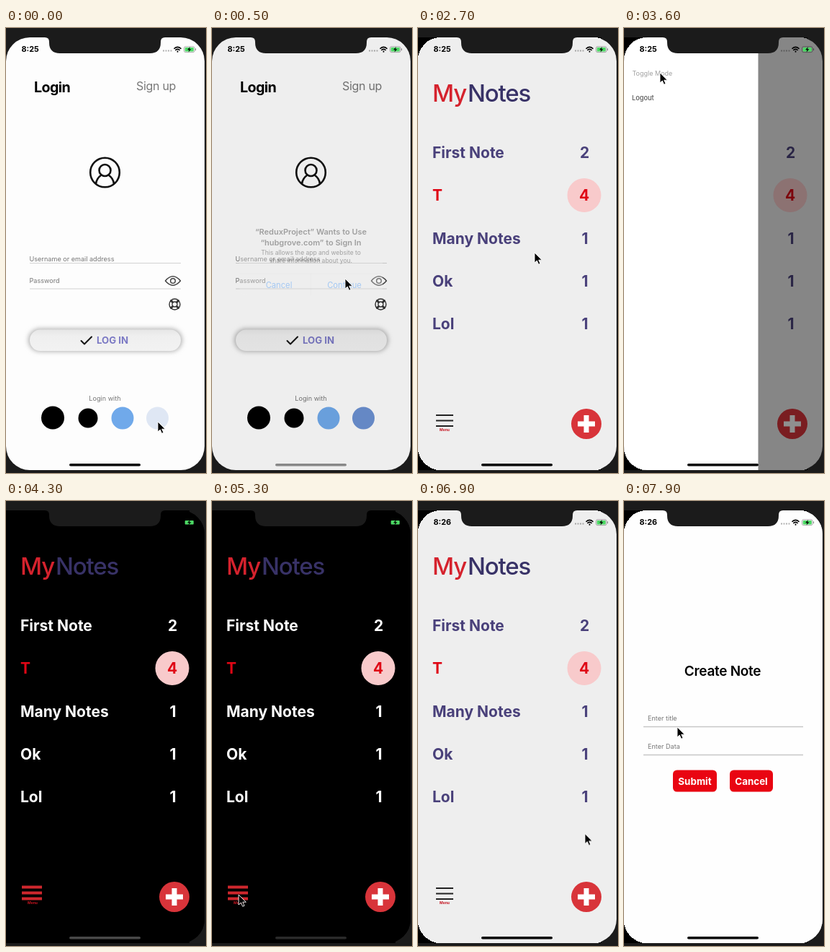
Animation of 278 by 616 pixels, one loop 8 s. Source, as an HTML page:

```html
<!DOCTYPE html>
<html lang="en">
<head>
<meta charset="utf-8">
<title>Notes app walkthrough</title>
<style>
html, body { margin: 0; width: 100%; height: 100%; overflow: hidden; background: #1b1b1b; }
svg { display: block; width: 278px; height: 616px; font-family: Inter, "Open Sans", sans-serif; }
text { dominant-baseline: central; }
.mid { text-anchor: middle; }
.web { font-family: "Liberation Sans", Arial, sans-serif; }
.link { fill: #2a6fe0; }
.ios { fill: #0a7aff; }
.line { fill: none; stroke-linecap: round; stroke-linejoin: round; }
.hint { font-size: 9.1px; fill: #777; }

/* shared 8 s clock */
.move { animation: 8s linear infinite; }
.cut { animation: 8s step-end infinite; }

#cursor { animation-name: cursor; }
#login { animation-name: card; }
#shade { animation-name: shade; }
#alert { animation-name: alert; }
#social { animation-name: social; }
#sheet { animation-name: sheet; animation-timing-function: ease-out; }
#page { animation-name: page; }
#actions { animation-name: actions; }
#progress { animation-name: progress; }
#notes { animation-name: notes; }
#drawer { animation-name: drawer; animation-timing-function: ease-out; }
#dim { animation-name: dim; }
#toggle { animation-name: toggle; }
#create { animation-name: create; animation-timing-function: ease-out; }
#home { animation-name: home; }
.bg { animation-name: bg; }
.rows { animation-name: rows; }
.light { animation-name: light; }
.dark { animation-name: dark; }
.early { animation-name: early; }
.late { animation-name: late; }

@keyframes cursor {
  0%, 1.8% { transform: translate(211px, 545px); }
  4.75%, 9% { transform: translate(185px, 347px); }
  18.75%, 31.25% { transform: translate(154px, 312px); }
  33.5%, 34% { transform: translate(162px, 311px); }
  37.5%, 40% { transform: translate(37px, 545px); }
  44%, 47.5% { transform: translate(50px, 62px); }
  49.5%, 51.25% { transform: translate(230px, 300px); }
  53.5%, 58% { transform: translate(150px, 625px); }
  64%, 68% { transform: translate(37px, 545px); }
  72%, 78% { transform: translate(50px, 62px); }
  81%, 83% { transform: translate(230px, 300px); }
  88%, 92% { transform: translate(233px, 546px); }
  98%, 100% { transform: translate(74px, 313px); }
}
@keyframes card {
  0%, 8.75% { transform: none; }
  12.5%, 23.75% { transform: translate(12.4px, 30.2px) scale(.91); }
  27.5%, 100% { transform: none; }
}
@keyframes shade {
  0%, 1.9% { opacity: 0; }
  3.75%, 5.4% { opacity: .2; }
  6.25% { opacity: .06; }
  7.5%, 8.75% { opacity: 0; }
  12.5%, 23.75% { opacity: .27; }
  27.5%, 100% { opacity: 0; }
}
@keyframes alert {
  0%, 1.9% { opacity: 0; }
  3.75%, 5.4% { opacity: 1; }
  6.25% { opacity: .33; }
  7.5%, 100% { opacity: 0; }
}
@keyframes social { 0%, .6% { opacity: .2; } 2.5%, 100% { opacity: 1; } }
@keyframes sheet {
  0%, 8.75% { transform: translateY(570px); }
  12.5%, 23.75% { transform: none; }
  27.5%, 100% { transform: translateY(570px); }
}
@keyframes page { 0% { opacity: 0; } 13.75%, 100% { opacity: 1; } }
@keyframes actions { 0% { opacity: 1; } 19.75%, 100% { opacity: .5; } }
@keyframes progress {
  0%, 10% { transform: scaleX(0); }
  13.7% { transform: scaleX(1); }
  13.8%, 19.75% { transform: scaleX(0); }
  20.5%, 21.5% { transform: scaleX(.116); }
  24%, 100% { transform: scaleX(.7); }
}
@keyframes notes { 0% { opacity: 0; } 28.75%, 100% { opacity: 1; } }
@keyframes drawer {
  0%, 39% { transform: translateX(-187px); }
  41.5%, 49.5% { transform: none; }
  52%, 67.5% { transform: translateX(-187px); }
  70%, 81% { transform: none; }
  83.5%, 100% { transform: translateX(-187px); }
}
@keyframes dim {
  0%, 39% { opacity: 0; }
  41.5%, 49.5% { opacity: .44; }
  52%, 67.5% { opacity: 0; }
  70%, 81% { opacity: .44; }
  83.5%, 100% { opacity: 0; }
}
@keyframes toggle {
  0% { opacity: 1; }
  44.5% { opacity: .55; }
  46.5% { opacity: 1; }
  75% { opacity: .55; }
  78%, 100% { opacity: 1; }
}
@keyframes create {
  0%, 90% { transform: translateX(278px); }
  93.5%, 100% { transform: none; }
}
@keyframes home {
  0%, 2.5% { fill: #000; }
  4.5%, 7.5% { fill: #888; }
  10%, 47% { fill: #000; }
  51%, 65% { fill: #484848; }
  68%, 100% { fill: #000; }
}
@keyframes bg { 0% { fill: #eee; } 46.25% { fill: #000; } 77.5%, 100% { fill: #eee; } }
@keyframes rows { 0% { fill: #49407a; } 46.25% { fill: #fff; } 77.5%, 100% { fill: #49407a; } }
@keyframes light { 0% { opacity: 1; } 46.25% { opacity: 0; } 77.5%, 100% { opacity: 1; } }
@keyframes dark { 0% { opacity: 0; } 46.25% { opacity: 1; } 77.5%, 100% { opacity: 0; } }
@keyframes early { 0% { opacity: 1; } 62.5%, 100% { opacity: 0; } }
@keyframes late { 0% { opacity: 0; } 62.5%, 100% { opacity: 1; } }
</style>
</head>
<body>
<svg viewBox="0 0 278 616">
  <defs>
    <clipPath id="screen"><rect y="13" width="276" height="599" rx="33"/></clipPath>
    <filter id="soft" x="-10%" y="-50%" width="120%" height="200%"><feGaussianBlur stdDeviation="3"/></filter>
    <linearGradient id="pill" x2="0" y2="1">
      <stop stop-color="#e6e6e6"/><stop offset=".3" stop-color="#efefef"/><stop offset="1" stop-color="#f2f2f2"/>
    </linearGradient>
  </defs>

  <g clip-path="url(#screen)">
    <rect width="278" height="616"/>

    <g id="login" class="move">
      <rect y="13" width="276" height="599" rx="9" fill="#fdfdfd"/>
      <text x="39" y="81.500" font-size="19.700" font-weight="700" letter-spacing="-.6">Login</text>
      <text x="181" y="80" font-size="16" letter-spacing="-.3" fill="#777">Sign up</text>
      <g class="line" stroke="#111" stroke-width="2.600">
        <circle cx="137.500" cy="200" r="20.300"/>
        <circle cx="137.500" cy="197" r="8"/>
        <path d="M125 215.500q1-7.500 7.500-12M150 215.500q-1-7.500-7.500-12"/>
      </g>
      <text class="hint" x="32.500" y="319.500">Username or email address</text>
      <text class="hint" x="32.500" y="349.700">Password</text>
      <path d="M33 325.500H243M33 361H243" stroke="#d2d2d2"/>
      <g class="line" stroke="#444" stroke-width="1.500">
        <path d="M221.500 350q10.500-12.500 21 0q-10.500 12.500-21 0z"/>
        <circle cx="232" cy="350" r="3.300"/>
      </g>
      <g class="line" transform="translate(234.500 382.500)" stroke="#333" stroke-width="1.400">
        <circle r="7.500"/><circle r="3.500"/>
        <path d="M-5-5l2 2M5-5l-2 2M-5 5l2-2M5 5l-2-2" stroke-width="3"/>
      </g>
      <rect x="31" y="416" width="214" height="32" rx="16" fill="#b2b2b2" filter="url(#soft)"/>
      <rect x="33" y="417.500" width="210" height="29.500" rx="14.700" fill="url(#pill)"/>
      <path class="line" d="M104.500 433l4.500 4.500 10-10" stroke="#111" stroke-width="2"/>
      <text x="126" y="432.300" font-size="13.200" font-weight="700" fill="#7b79c4">LOG IN</text>
      <text class="hint mid" x="137.500" y="512.700">Login with</text>
      <circle cx="65" cy="539.500" r="16"/>
      <circle cx="114" cy="540" r="13.500"/>
      <circle cx="162" cy="540" r="15.500" fill="#70a9ea"/>
      <circle id="social" class="move" cx="210.500" cy="540" r="15.500" fill="#6c91d2"/>
      <rect id="shade" class="move" y="13" width="276" height="599" rx="9"/>
    </g>

    <g id="alert" class="move">
      <rect x="38" y="268" width="199" height="102" rx="10" fill="#efefef"/>
      <path d="M38 340H237M137.500 340V370" stroke="#ddd" stroke-width=".7"/>
      <g class="mid" font-size="11" font-weight="600">
        <text x="137.500" y="282">“ReduxProject” Wants to Use</text>
        <text x="137.500" y="297">“hubgrove.com” to Sign In</text>
      </g>
      <g class="mid" font-size="8.500">
        <text x="137.500" y="311">This allows the app and website to</text>
        <text x="137.500" y="321.500">share information about you.</text>
      </g>
      <g class="mid ios" font-size="11.200">
        <text x="93" y="355.500">Cancel</text>
        <text x="184" y="355.500">Continue</text>
      </g>
    </g>

    <g id="sheet" class="move">
      <rect y="48.500" width="276" height="600" rx="8" fill="#f5f5f7"/>
      <text class="ios" x="8.500" y="68" font-size="11.800">Cancel</text>
      <text class="mid" x="137.500" y="68" font-size="11" font-weight="600">hubgrove.com</text>
      <text class="ios" x="226" y="68.500" font-size="8.500">A<tspan font-size="11">A</tspan></text>
      <path class="line" d="M254 64.500l8 8m0-8l-8 8" stroke="#0a7aff" stroke-width="1.300"/>
      <g id="page" class="cut">
        <rect y="86" width="276" height="37" fill="#344f8a"/>
        <rect x="12.500" y="97" width="16" height="16" rx="1" fill="#fff"/>
        <text class="mid" x="135" y="105.700" font-size="11.700" font-weight="500" fill="#fff">Log in With Hubgrove</text>
        <circle cx="137.500" cy="158" r="23.500" fill="#6b7086"/>
        <g class="web mid" font-size="9.300" fill="#333">
          <text x="137.500" y="208">You previously logged in to Daily Scratchpad with</text>
          <text x="137.500" y="220">Hubgrove.</text>
          <text x="137.500" y="244">Would you like to continue?</text>
        </g>
        <g id="actions" class="cut web mid">
          <rect x="44" y="311" width="187" height="33.500" rx="3" fill="#4c7adc"/>
          <text x="137.500" y="328.500" font-size="11.200" fill="#fff">Continue</text>
          <text x="137.500" y="376" font-size="9.300" fill="#a0a0a0">Cancel</text>
        </g>
        <g class="web mid" font-size="8.600" fill="#444">
          <text x="137.500" y="469.500">By continuing, Daily Scratchpad will receive ongoing access to the</text>
          <text x="137.500" y="483">information that you share and Hubgrove will record when Daily</text>
          <text x="137.500" y="496">Scratchpad accesses it. <tspan class="link">Learn more</tspan> about this sharing and the</text>
          <text x="137.500" y="509.500">settings that you have.</text>
          <text x="137.500" y="541">Daily Scratchpad's <tspan class="link">Privacy Policy</tspan></text>
        </g>
      </g>
      <rect id="progress" class="move" y="84.500" width="276" height="1.700" fill="#0a7aff"/>
      <rect y="556" width="276" height="60" fill="#f8f8fa"/>
      <path d="M0 556.500H276" stroke="#ccc" stroke-width=".8"/>
      <g class="line" stroke-width="1.400">
        <path d="M22 569l-6 5.500 6 5.500M75 569l6 5.500-6 5.500" stroke="#c4c4c8"/>
        <path d="M252.500 571.500h-3.500v10.500h12v-10.500h-3.500M255 577.500v-11m-3 3l3-3 3 3" stroke="#0a7aff" stroke-width="1.200"/>
      </g>
    </g>

    <g id="notes" class="cut">
      <rect class="bg cut" width="278" height="616"/>
      <g font-size="33" font-weight="500" letter-spacing="-1.200">
        <text x="20" y="90" fill="#d5222d">My</text>
        <text x="69" y="90" fill="#383267">Notes</text>
      </g>
      <circle cx="231" cy="231.500" r="23.500" fill="#f8cacb"/>
      <g class="rows cut" font-size="21" font-weight="700">
        <text x="20" y="172.500">First Note</text>
        <text x="20" y="231.500" fill="#df0615">T</text>
        <text x="20" y="291">Many Notes</text>
        <text x="20" y="350">Ok</text>
        <text x="20" y="409">Lol</text>
        <g class="mid">
          <text x="231.500" y="172.500">2</text>
          <text x="231" y="231.500" fill="#df0615">4</text>
          <text x="232" y="291">1</text>
          <text x="232" y="350">1</text>
          <text x="232" y="409">1</text>
        </g>
      </g>
      <path class="light cut" d="M25 536H49M25 543.500H49M25 551H49" stroke="#222" stroke-width="2"/>
      <path class="dark cut" d="M22 534.500H50M22 542.500H50M22 550.500H50" stroke="#cf272d" stroke-width="4"/>
      <text class="mid" x="37" y="556" font-size="5" font-weight="700" fill="#c6141f">Menu</text>
      <circle cx="234" cy="548" r="21" fill="#d8343a"/>
      <path d="M222 548H246M234 536V560" stroke="#fff" stroke-width="7"/>
      <rect id="dim" class="move" width="278" height="616"/>
    </g>

    <g id="drawer" class="move">
      <rect width="186.500" height="616" fill="#fff"/>
      <text id="toggle" class="cut" x="11.500" y="62.500" font-size="9" fill="#555">Toggle Mode</text>
      <text x="11" y="96.500" font-size="9.200" font-weight="500" fill="#555">Logout</text>
    </g>

    <g id="create" class="move">
      <rect width="278" height="616" fill="#fefefe"/>
      <text class="mid" x="137" y="235" font-size="19" font-weight="600" letter-spacing="-.3">Create Note</text>
      <text class="hint" x="33" y="300">Enter title</text>
      <text class="hint" x="33" y="339">Enter Data</text>
      <path d="M27 312.500H249M27 351.500H249" stroke="#c6c6c6" stroke-width="1.600"/>
      <g fill="#e90512">
        <rect x="68" y="372.500" width="61" height="30" rx="5.500"/>
        <rect x="147" y="372.500" width="60" height="30" rx="5.500"/>
      </g>
      <g class="mid" font-size="13.400" font-weight="700" fill="#fff">
        <text x="98.500" y="388">Submit</text>
        <text x="177" y="388">Cancel</text>
      </g>
    </g>

    <path d="M54 13q6 0 6 6v1q0 15 15 15h125q15 0 15-15v-1q0-6 6-6z" fill="#1b1b1b"/>
    <g font-size="10.800" font-weight="700">
      <text class="early cut" x="21.500" y="29.500">8:25</text>
      <text class="late cut" x="21.500" y="29.500">8:26</text>
    </g>
    <path d="M218 31.500H231" stroke="#000" stroke-opacity=".3" stroke-width="1.800" stroke-dasharray="2 1.500"/>
    <g class="line" stroke="#000" stroke-width="1.600">
      <path d="M234 28.300q4.500-3.800 9 0M235.800 30.500q2.700-2.200 5.400 0"/>
      <path d="M238.500 32.600v.1" stroke-width="2"/>
    </g>
    <g stroke="#000" stroke-opacity=".4">
      <rect x="247.500" y="25.800" width="14.500" height="7.800" rx="2" fill="none" stroke-width=".8"/>
      <path d="M263.500 28.300v2.800" stroke-width="1.200"/>
    </g>
    <rect x="248.700" y="27" width="12.100" height="5.400" rx="1" fill="#4cd964"/>
    <path d="M256 26l-4 4.300h2.500l-1 3.300 4-4.400h-2.500z"/>
    <rect id="home" class="move" x="88" y="603" width="99" height="3.600" rx="1.800"/>
  </g>

  <path id="cursor" class="move" d="M0 0v14l3.300-3 2.300 5.200 2.400-1-2.300-5h4.600z" stroke="#fff" stroke-width=".9"/>
</svg>
</body>
</html>
```
